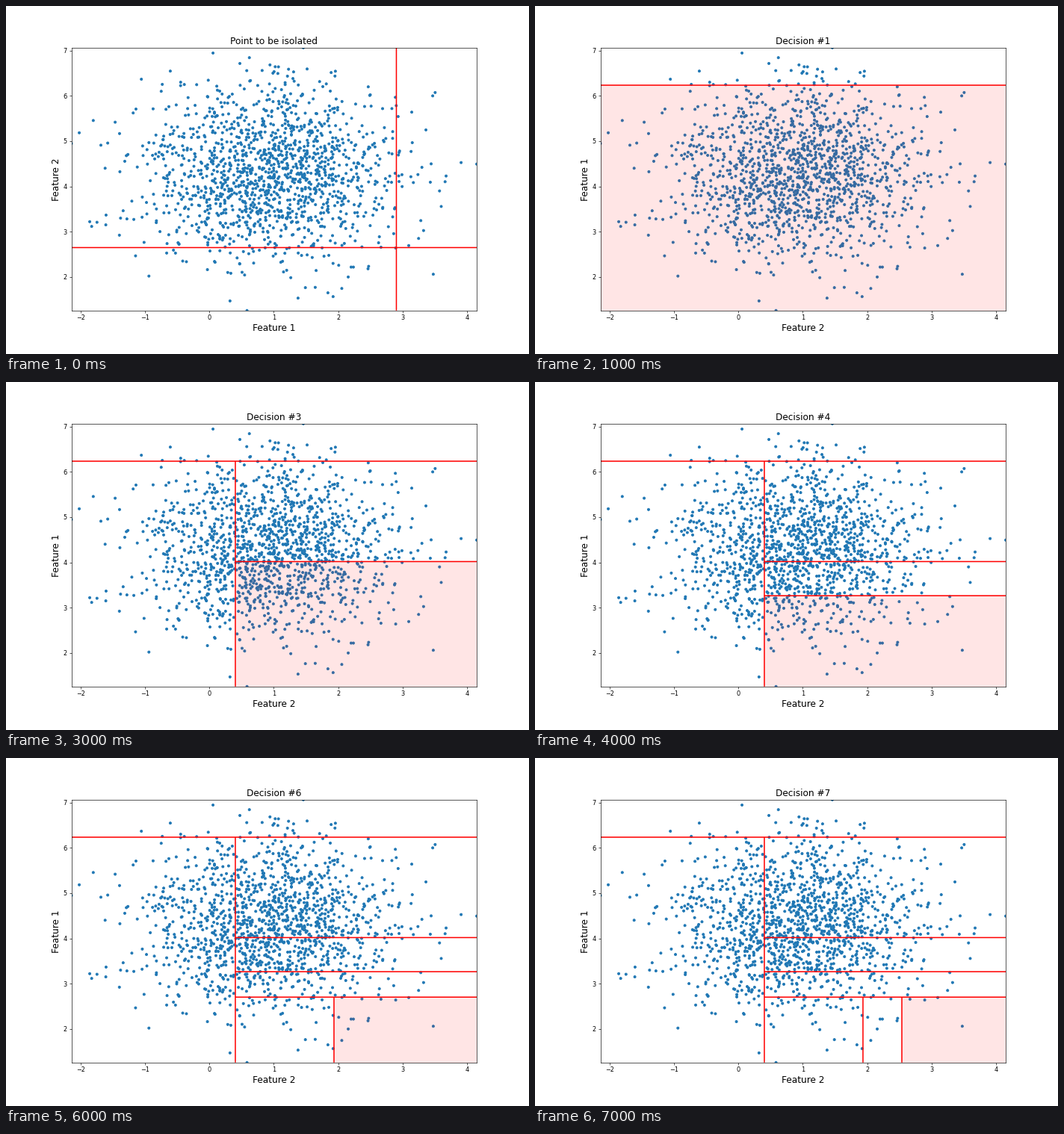
Animation of 700 by 466 pixels, one loop 8000 ms. Source, as a matplotlib script:

```python
import math

import matplotlib.pyplot as plt
import numpy as np
from matplotlib.animation import FuncAnimation
from matplotlib.patches import Rectangle

W, H, DPI = 700, 466, 175 / 3
X0, X1 = -2.1406, 4.1472
Y0, Y1 = 1.2575, 7.0631
TARGET = (2.901, 2.648)
OUTLIERS = 70
# Each cut: the axis it splits and the value it splits at.
CUTS = [("y", 6.236), ("x", 0.403), ("y", 4.018), ("y", 3.264),
        ("y", 2.702), ("x", 1.933), ("x", 2.536)]


def make_points(pool_size=2000):
    """A normal blob, grown by hundreds until it has enough outliers."""
    rng = np.random.RandomState(0)
    pool = rng.normal(rng.uniform(-10, 10, 2), 1, (pool_size, 2))
    x, y = pool.T
    found = np.cumsum((x < -1.1) | (x > 3.05) | (y < 2.25))
    needed = np.argmax(found >= OUTLIERS) + 1
    return pool[:100 * math.ceil(needed / 100)]


def split(count):
    """Segments of the first cuts and the box left around the target."""
    x0, x1, y0, y1 = X0, X1, Y0, Y1
    lines = []
    for axis, v in CUTS[:count]:
        if axis == "y":
            lines.append(([x0, x1], [v, v]))
            y0, y1 = (v, y1) if TARGET[1] > v else (y0, v)
        else:
            lines.append(([v, v], [y0, y1]))
            x0, x1 = (v, x1) if TARGET[0] > v else (x0, v)
    return lines, (x0, y0, x1 - x0, y1 - y0)


fig = plt.figure(figsize=((W + 1e-6) / DPI, (H + 1e-6) / DPI), dpi=DPI,
                 facecolor="white")
fig.subplots_adjust(left=0.125, right=0.9, bottom=0.125, top=0.88)
ax = fig.add_subplot()
points = make_points()
# One size per dot keeps the dots off the pixel grid.
sizes = np.full(len(points), 15.0)


def draw(step):
    ax.clear()
    ax.scatter(*points.T, s=sizes, color="#1f77b4")
    if step == 0:
        lines = [([X0, X1], [TARGET[1]] * 2), ([TARGET[0]] * 2, [Y0, Y1])]
        title, names = "Point to be isolated", ("Feature 1", "Feature 2")
    else:
        lines, (x, y, w, h) = split(step)
        ax.add_patch(Rectangle((x, y), w, h, color="red", alpha=0.1, lw=0))
        title, names = f"Decision #{step}", ("Feature 2", "Feature 1")
    for xs, ys in lines:
        ax.plot(xs, ys, color="red", lw=1.9, solid_capstyle="butt", snap=False)
    ax.set_xlim(X0, X1)
    ax.set_ylim(Y0, Y1)
    ax.set_title(title, fontsize=15, pad=6.6)
    ax.set_xlabel(names[0], fontsize=15, labelpad=2.8)
    ax.set_ylabel(names[1], fontsize=15, labelpad=2.8)


anim = FuncAnimation(fig, draw, frames=8, interval=1000, repeat=True,
                     repeat_delay=0, init_func=lambda: draw(0))
plt.show()
```
